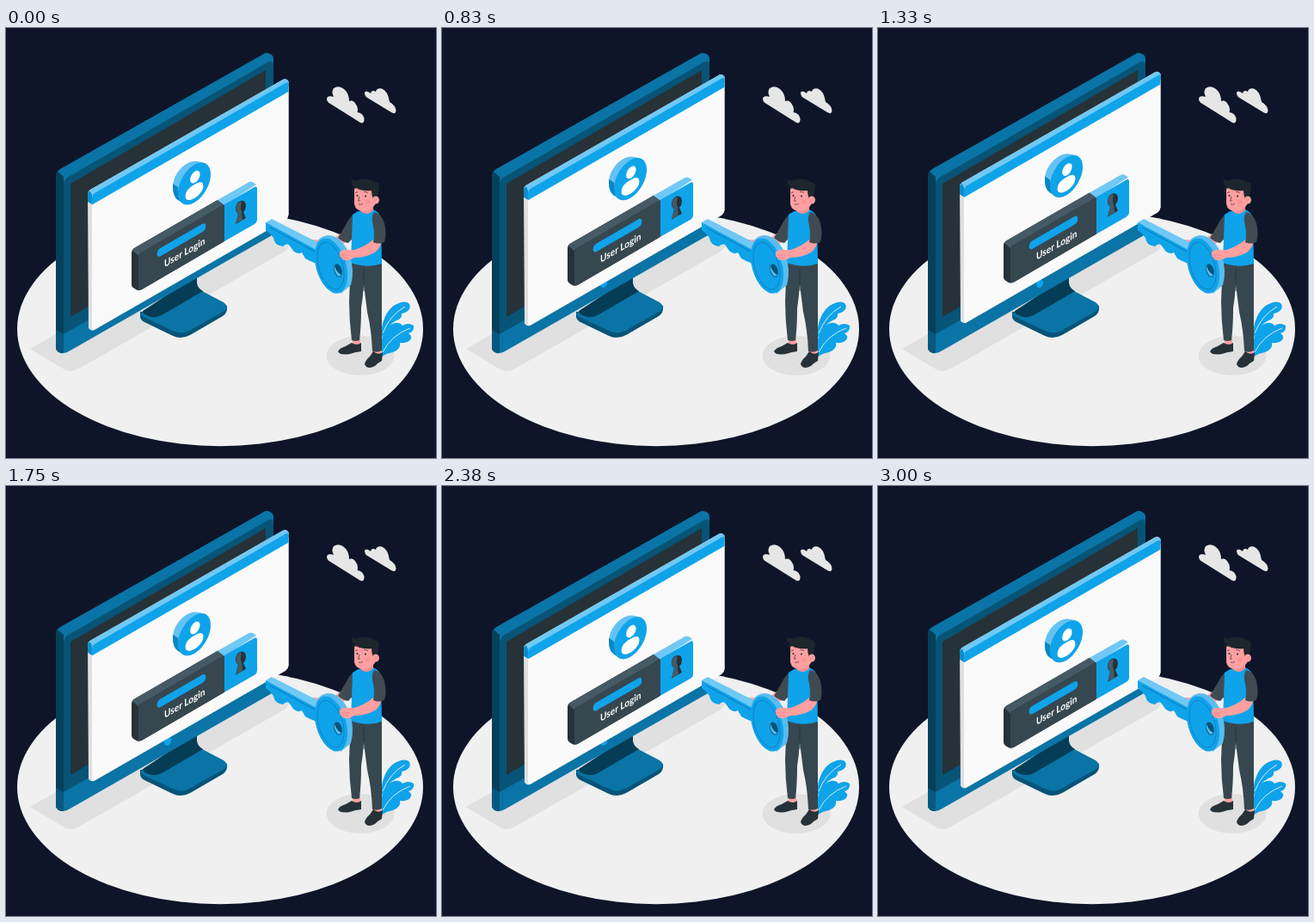
An HTML page that plays this animation: 500x500 px, repeating every 3.04 s.

```html
<!DOCTYPE html>
<html lang="en">
<head>
<meta charset="utf-8">
<title>User Login</title>
<style>
  html, body { margin: 0; width: 100%; height: 100%; overflow: hidden; background: #0e1529; }
  svg { display: block; width: 100%; height: 100%; }
  text { font: 700 11.7px Lato, "Open Sans", sans-serif; }
</style>
</head>
<body>
<svg viewBox="0 0 500 500">
  <ellipse cx="249" cy="350" rx="236" ry="136.200" fill="#f0f0f0"/>
  <path d="M28 373L300 218L330 250Q329 257 322 261L85 396Q75 402 66 396Z" fill="#e0e0e0"/>
  <ellipse cx="412" cy="381" rx="39.500" ry="23" fill="#e0e0e0"/>

  <g id="clouds" fill="#e6e6e6">
    <path d="M373 82Q374 78 381 80Q378 74 381 70Q387 66 393 71Q399 76 399 85Q404 83 407 89Q410 93 408.500 98Q415 99 416.500 105Q417 112 412 110L377 88Q373 86 373 82Z"/>
    <path d="M417 75Q419 72 424 76Q425 71 430 74Q431 69.500 437 70.500Q444 73 446 86Q453 90 453.500 96Q453 101 448 98L420 81Q417 79 417 75Z"/>
  </g>

  <g id="stand">
    <path d="M156 330V336Q157 340 161 342L193 357.500Q204 363 215 356.500L252 335Q258 331 257 323Z" fill="#075477"/>
    <path d="M158 331L222 285V297Q223 303 230 307L253 319Q261 325 252 330L214 351.500Q204 357 194 352L160 336Q154 333 158 331Z" fill="#0a74a6"/>
    <path d="M159 329L222 288V297Q223 303 229 306L181 334Q173 338 166 335Q159 333 159 329Z" fill="#053d56"/>
  </g>

  <g id="monitor">
    <path d="M58 173Q58 167 63 164L299 30.500Q304 27 310 32L311 35V240L73 376Q64 381 58 373Z" fill="#0a74a6"/>
    <path d="M58 173Q58 169 60 167L67 173V378Q61 378 58 373Z" fill="#05405b"/>
    <path d="M67 182Q67 177 71 174L304 40Q311 36 311 44V216L67 356Z" fill="#075477"/>
    <path d="M75 181L302 49V202L75 336Z" fill="#263238"/>
    <path d="M58 351L67 356V378Q60 379 58 373Z" fill="#07587f"/>
    <ellipse cx="188" cy="297" rx="4" ry="5" transform="rotate(25 188 297)" fill="#0fa3ea"/>
  </g>

  <g id="panel">
    <path d="M95 193Q95 190 98 188L322 60Q326 58 328.500 62V217Q328 221 325 223L103 351Q99 353 96 349Z" fill="#e0e0e0"/>
    <path d="M100 200L328.500 68V217Q328 221 325 223L103 350.500Q100 352 100 349Z" fill="#fafafa"/>
    <path d="M95 193Q95 190 98 188L322 60Q326 58 328.500 62L328 66L100 196Z" fill="#70c8f4"/>
    <path d="M95 192Q96 190 98 190L100 194V205L95 202Z" fill="#0b8dce"/>
    <path d="M100 197Q100 194 103 192L325 64Q328.500 62 328.500 65V74L100 205.500Z" fill="#0fa3ea"/>

    <g id="avatar">
      <path d="M194 185C194 171 205 158 217 155Q223 154 232 158L207 203L200 200Q194 196 194 185Z" fill="#63c2f3"/>
      <path d="M194 181L200 185Q200 198 207 204L200 200Q194 196 194 185Z" fill="#0a86c4"/>
      <g transform="matrix(.866 -.5 0 1 219 181)">
        <circle r="22" fill="#0fa3ea"/>
        <circle cx="1" cy="-7.300" r="6.600" fill="#fff"/>
        <path d="M-12 9C-12 2 -6 1 0 1S12 2 12 9C12 14 6 17 0 17S-12 14 -12 9Z" fill="#fff"/>
      </g>
    </g>

    <g id="bar">
      <path d="M146 261Q146 258 149 256L246 200L254 205V248L158 304Q154 306 151 304L148 302Q146 301 146 298Z" fill="#263238"/>
      <path d="M147 258L149 256L246 200L254 205L156 262Q154 263 154 265Z" fill="#455a64"/>
      <path d="M154 266Q154 263 157 261L254 205V248L158 304Q154 306 154 302Z" fill="#37474f"/>
      <path d="M246 200L282 179.500Q285 178 288 180L291 182L254 206Z" fill="#70c8f4"/>
      <path d="M254 205L288 185.500Q292 183 292 187V223Q292 226 289 228L254 248Z" fill="#0fa3ea"/>
      <path d="M-28 0H28" transform="matrix(.866 -.5 0 1 204 246.500)" stroke="#0fa3ea" stroke-width="9.500" stroke-linecap="round"/>
      <path d="M267 210Q267 203 273 201Q279 200 279 207Q279 211 276 214L279 221L267 228L270 216Q267 214 267 210Z" fill="#263238"/>
      <path d="M268 206Q270 202 274 202Q272 210 274 213L275 223L267 228L270 216Q266 212 268 206Z" fill="#455a64"/>
      <text transform="matrix(.866 -.5 0 1 184 278.500)" fill="#fff">User Login</text>
    </g>
  </g>

  <g id="plant" fill="#0fa3ea">
    <path d="M437 360C435 341 445 319 464 318.500Q471 319 469.500 326Q467 331 460 332Q461 338 454 340Q445 344 437 360Z"/>
    <path d="M437 382V362Q441 346 452 343Q458 342 461 346Q468 342 474 346Q475 353 468 355Q475 360 467 365Q461 367 458 366Q460 373 450 377Q443 378 437 382Z"/>
    <path d="M438 355Q446 334 464 324M438 377Q448 357 470 349" fill="none" stroke="#fff" stroke-width=".8"/>
  </g>

  <g id="legs">
    <path d="M403 360L412 361L412 371L403 370ZM427 370L437 370L436 382L427 381Z" fill="#ffa0a0"/>
    <path d="M386 376Q388 372 395 370L402 366Q408 370 413 366V376Q405 377 400 379Q388 381 386 376Z" fill="#263238"/>
    <path d="M417 391Q418 386 423 382L427 376Q433 381 438 377L437 387Q433 389 429 393Q420 398 417 391Z" fill="#263238"/>
    <path d="M401 269H437V375Q432 378 426 376Q425 351 420 330L416 298Q415 313 413 326Q413 347 411 363Q407 365 402 363Q399 340 399 318Q400 293 401 269Z" fill="#37474f"/>
    <path d="M416 279V306" stroke="#263238" stroke-width=".8"/>
  </g>

  <g id="torso">
    <path d="M389 239L399 246Q389 256 371 253L354 250Q350 247 356 246L378 247Z" fill="#ffa0a0"/>
    <path d="M405 216Q399 220 395 229L386 244Q391 249 398 250L408 239Z" fill="#404b51"/>
    <path d="M403 217Q408 213 413 212L427 211Q435 214 436 223L437 274Q420 280 401 273Z" fill="#0fa3ea"/>
    <path d="M411 202H427V212Q421 219 413 214Z" fill="#f58e91"/>
  </g>

  <g id="head">
    <path d="M405 187Q415 181 428 186L430 204Q425 213 416 213Q407 213 405 205Z" fill="#ffa0a0"/>
    <path d="M402 187Q404 184 406 184Q400 182 402 176Q406 179 411 176Q421 174 429 179Q436 180 433 188Q434 192 431 196L427 199Q425 194 425 189Q414 190 407 186Z" fill="#1d262c"/>
    <ellipse cx="430" cy="200" rx="4" ry="4.600" fill="#ffa0a0"/>
    <path d="M429 202Q429 198 432 199" fill="none" stroke="#e77f86" stroke-width=".8"/>
    <ellipse cx="421" cy="202" rx="3" ry="2.500" fill="#f98388" opacity=".5"/>
    <path d="M406 192L409 190.500M416 190L421 191.500M410 205Q413 206 415 204M411 196L409.500 201L412 201" fill="none" stroke="#5b3940" stroke-width=".8"/>
    <g fill="#263238"><circle cx="408.500" cy="195" r="1.100"/><circle cx="418" cy="195.500" r="1.100"/></g>
  </g>

  <g id="key">
    <path d="M302 226L309 222L364 250V258L359 262Z" fill="#70c8f4"/>
    <path d="M302 226L361 258V274Q353 271 348 268L344 261Q339 264 334 259L329 252Q326 250 322 254L318 253Q312 251 311 244L307 239L302 235Z" fill="#0fa3ea"/>
    <path d="M307 232L359 260" stroke="#0878b4" stroke-width="1"/>
    <path d="M361 250Q365 242 374 241Q389 241 399 262Q406 282 401 299L389 309Z" fill="#58bcef"/>
    <ellipse cx="378" cy="276.500" rx="17.500" ry="33" transform="rotate(-16 378 276.500)" fill="#0fa3ea"/>
    <ellipse cx="377.500" cy="276.500" rx="14" ry="28" transform="rotate(-16 377.500 276.500)" fill="none" stroke="#0c83c8" stroke-width="1"/>
    <ellipse cx="386" cy="282" rx="4.500" ry="7.800" transform="rotate(-16 386 282)" fill="#075477"/>
    <path d="M382 277Q385 285 390 287Q387 291 384 286Q381 281 382 277Z" fill="#58bcef"/>
  </g>

  <g id="arm">
    <path d="M427 246L438 243Q436 256 429 261Q418 267 405 267Q398 272 391 269L388 265Q386 259 393 258L405 258Q418 254 427 246Z" fill="#ffa0a0"/>
    <path d="M389 264H399M390 267H398" stroke="#ed8088" stroke-width=".8"/>
    <path d="M428 214Q436 215 440 227Q443 239 440 249Q433 252 427 249Q429 239 427 230Q424 220 428 214Z" fill="#404b51"/>
  </g>
</svg>
<script>
  const LOOP = 3040, RISE = 9.8;
  const panel = document.getElementById("panel");

  // The panel glides up for half the loop, then back down.
  function draw() {
    const phase = performance.now() % LOOP / LOOP;
    const lift = RISE * (1 - Math.abs(1 - 2 * phase));
    panel.setAttribute("transform", `translate(0 ${-lift})`);
    requestAnimationFrame(draw);
  }
  draw();
</script>
</body>
</html>
```
